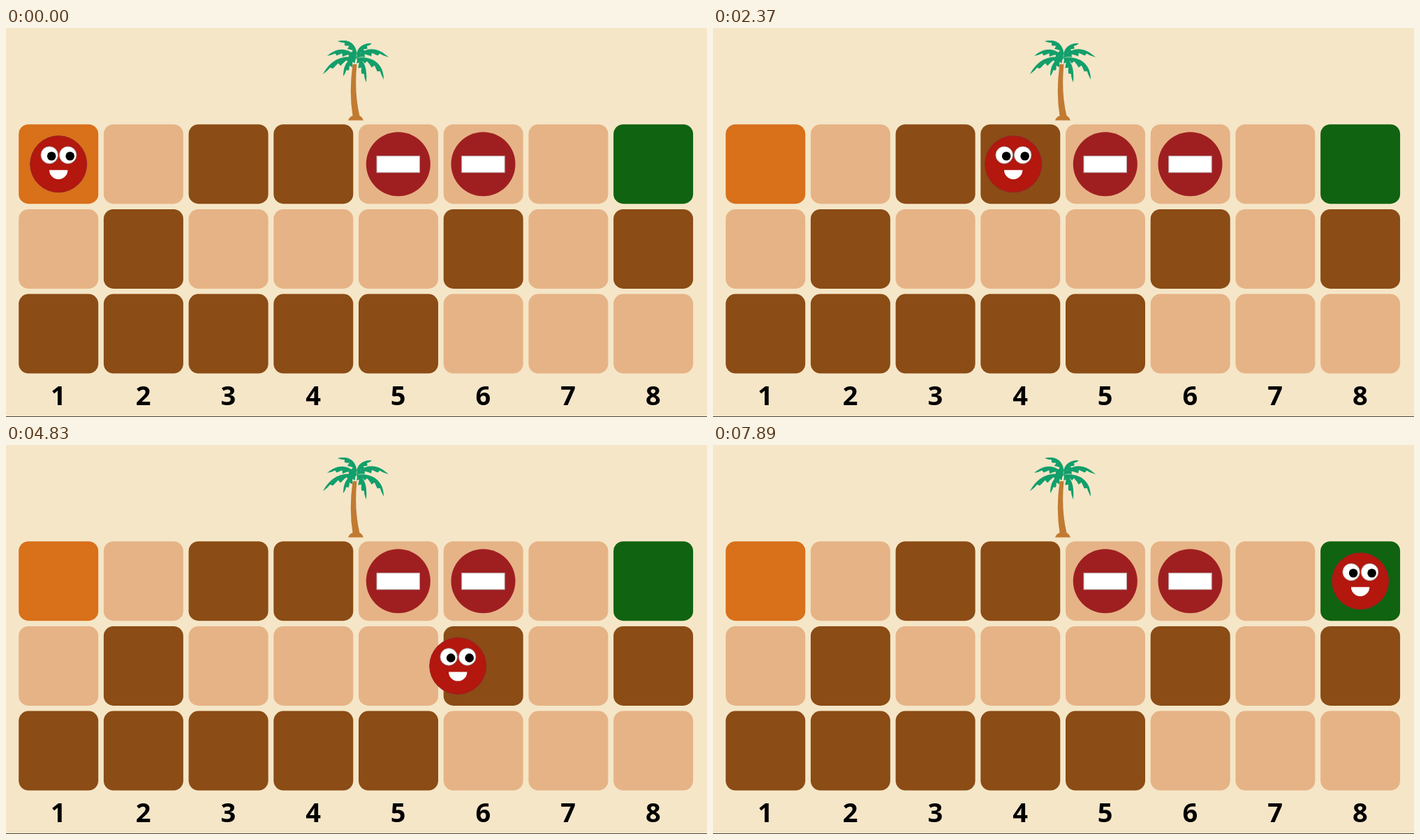
An HTML page for the animation above (7920 ms loop, 1004 by 558 pixels).

```html
<!DOCTYPE html>
<html lang="en">
<head>
<meta charset="utf-8">
<title>Grid walk</title>
<style>
  html, body { margin: 0; width: 100%; height: 100%; overflow: hidden; background: #f5e6c8; }
  svg { display: block; width: 1004px; height: 558px; }
  text { font: bold 38px "Open Sans", "Noto Sans", sans-serif; text-anchor: middle; }
</style>
</head>
<body>
<svg id="stage" viewBox="0 0 1004 558">
  <rect width="1004" height="558" fill="#f5e6c8"/>
  <g id="palm">
    <path fill="#c17a32" d="M496.5 52 Q491 92 496.5 126 Q492 127 490 132.5 H512 Q510 127 506.5 126 Q498.500 92 502.500 52 Z"/>
    <path id="leaves" fill="#129f6b"/>
  </g>
  <g id="board"></g>
  <rect y="557" width="1004" height="1" fill="#4b4842"/>
  <g id="face">
    <circle r="40.5" fill="#b3170e" stroke="#95222a"/>
    <g fill="#fff" stroke="#9b928f" stroke-width=".8">
      <circle cx="-13" cy="-13" r="12.300"/>
      <circle cx="13.500" cy="-13" r="12.300"/>
    </g>
    <circle cx="-10" cy="-11.500" r="6.300"/>
    <circle cx="16.500" cy="-11.500" r="6.300"/>
    <path fill="#fff" d="M-13.200 8.500 H13.200 A13.200 13.200 0 0 1 -13.200 8.500 Z"/>
  </g>
</svg>
<script>
const PITCH = 121.7, TILE = 114, FIRST_X = 75.2, FIRST_Y = 195.2;
const COLORS = { o: '#d9701a', s: '#e6b386', x: '#e6b386', b: '#8b4c15', g: '#106310' };
const MAP = ['osbbxxsg', 'sbsssbsb', 'bbbbbsss'];
const ROUTE = [[0, 0], [1, 0], [2, 0], [3, 0], [3, 1], [4, 1], [5, 1], [6, 1], [6, 0], [7, 0]];
const LOOP = 7920, TICK = 30, START = 120, FAST = 300, SLOW = 1800;

const byId = id => document.getElementById(id);
const center = (col, row) => [FIRST_X + col * PITCH, FIRST_Y + row * PITCH];

function drawBoard() {
  let tiles = '';
  MAP.forEach((line, row) => [...line].forEach((kind, col) => {
    const [x, y] = center(col, row);
    tiles += `<rect x="${x - TILE / 2}" y="${y - TILE / 2}" width="${TILE}" height="${TILE}" rx="14" fill="${COLORS[kind]}"/>`;
    if (kind === 'x') tiles +=
      `<circle cx="${x - .2}" cy="${y}" r="46" fill="#9f1f21"/>
       <rect x="${x - 31}" y="${y - 11.5}" width="61.500" height="23.500" fill="#fff" stroke="#b9a5a5"/>`;
  }));
  for (let col = 0; col < 8; col++)
    tiles += `<text x="${center(col, 0)[0] - .3}" y="540.5">${col + 1}</text>`;
  byId('board').innerHTML = tiles;
}

// A frond follows a quadratic spine: smooth on one side, notched on the other.
function frond([cx, cy, tipX, tipY, side]) {
  const rootX = 502, rootY = 43, steps = 28, smooth = [], notched = [];
  for (let i = 0; i <= steps; i++) {
    const u = i / steps, v = 1 - u;
    const x = v * v * rootX + 2 * u * v * cx + u * u * tipX;
    const y = v * v * rootY + 2 * u * v * cy + u * u * tipY;
    const dx = v * (cx - rootX) + u * (tipX - cx), dy = v * (cy - rootY) + u * (tipY - cy);
    const len = Math.hypot(dx, dy), swell = Math.sin(Math.PI * u ** .8);
    const offset = w => `${(x - side * dy / len * w).toFixed(1)} ${(y + side * dx / len * w).toFixed(1)}`;
    smooth.push(offset(-3 * swell));
    notched.unshift(offset(swell * (2.5 + 5 * (i % 7) / 6)));
  }
  return 'M' + smooth.concat(notched).join('L') + 'Z';
}

function facePosition(time) {
  let left = time - START;
  if (left <= 0) return center(...ROUTE[0]);
  for (let i = 0; i < ROUTE.length - 1; i++) {
    const [col, row] = ROUTE[i], [nextCol, nextRow] = ROUTE[i + 1];
    // Leaving mud is slow; the square at column 4 of row 1 is mud too.
    const duration = MAP[row][col] === 'b' ? SLOW : FAST;
    if (left < duration) {
      const u = left / duration;
      return center(col + (nextCol - col) * u, row + (nextRow - row) * u);
    }
    left -= duration;
  }
  return center(...ROUTE[ROUTE.length - 1]);
}

function render(now) {
  const time = Math.floor(now % LOOP / TICK) * TICK;
  byId('face').setAttribute('transform', `translate(${facePosition(time)})`);
  requestAnimationFrame(() => render(performance.now() - begin));
}

drawBoard();
byId('leaves').setAttribute('d', [
  [498, 17, 475, 19, -1], [507, 25, 524, 22, 1],
  [523, 24, 548, 42, 1], [537, 45, 541, 74, 1],
  [514, 51, 516, 78, 1], [487, 49, 483, 69, -1],
  [471, 42, 454, 66, -1], [482, 26, 460, 40, -1]
].map(frond).join(''));
const begin = performance.now();
render(0);
</script>
</body>
</html>
```
